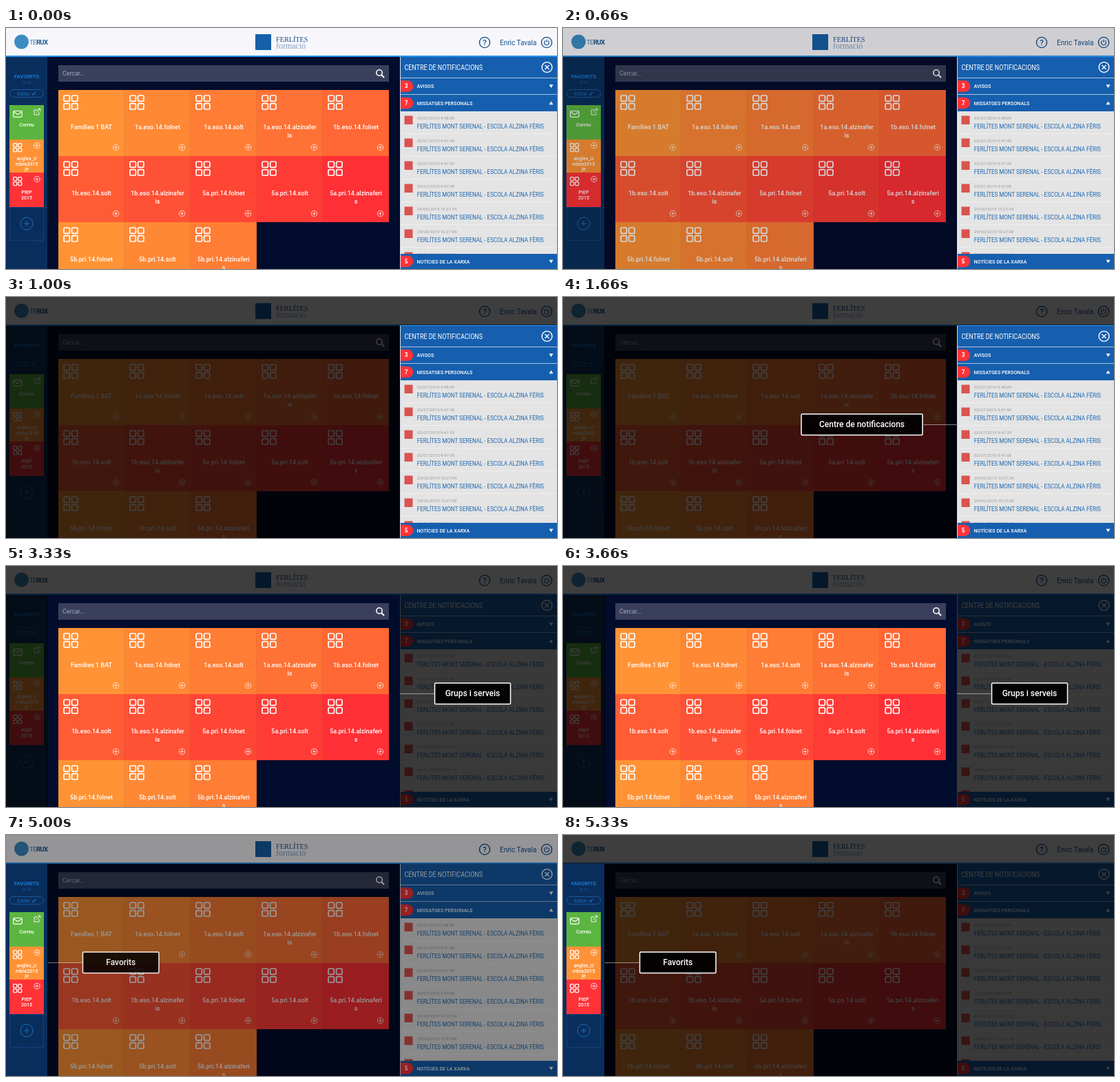
These frames come from a looping animation (800 px wide and 350 px high, 6660 ms). An HTML page:

```html
<!DOCTYPE html>
<html lang="ca">
<head>
<meta charset="utf-8">
<title>Tour</title>
<style>
  html, body { margin: 0; width: 100%; height: 100%; overflow: hidden; background: #020c2d; }
  svg { display: block; }
  text { font-family: Roboto, sans-serif; }
  .serif { font-family: "Liberation Serif", "Noto Serif", serif; }
</style>
</head>
<body>
<svg id="stage" width="800" height="350" viewBox="0 0 800 350"></svg>
<script>
const NARROW = 0.885; // condensed cut of the interface face
const WHITE = '#fff', BLUE = '#165fae', INK = '#17508f', TRIM = '#15599f';

const rect = (x, y, w, h, fill, more = '') =>
  `<rect x="${x}" y="${y}" width="${w}" height="${h}" fill="${fill}" ${more}/>`;
const line = (d, stroke, width = 1, more = '') =>
  `<path d="${d}" fill="none" stroke="${stroke}" stroke-width="${width}" ${more}/>`;
const ring = (x, y, r, stroke, width = 1) =>
  `<circle cx="${x}" cy="${y}" r="${r}" fill="none" stroke="${stroke}" stroke-width="${width}"/>`;
const text = (x, y, size, fill, str, more = '') =>
  `<text x="${x}" y="${y}" font-size="${size}" fill="${fill}" ${more}>${str}</text>`;
const centred = (x, y, size, fill, str, weight = 400) =>
  text(x, y, size, fill, str, `text-anchor="middle" font-weight="${weight}"`);
const narrow = (x, y, size, fill, str, weight = 400) =>
  `<g transform="translate(${x} ${y}) scale(${NARROW} 1)">` +
  text(0, 0, size, fill, str, `font-weight="${weight}"`) + '</g>';
const plus = (x, y, r, arm, stroke, width) =>
  ring(x, y, r, stroke, width) +
  line(`M${x - arm} ${y}h${2 * arm}M${x} ${y - arm}v${2 * arm}`, stroke, width);

// four rounded squares
function groupIcon(x, y, size, step, width) {
  let out = '';
  for (let i = 0; i < 4; i++)
    out += rect(x + (i % 2) * step, y + (i >> 1) * step, size, size, 'none',
      `rx="${size / 4.5}" stroke="#fff" stroke-width="${width}"`);
  return out;
}

function header() {
  return rect(0, 0, 800, 40, '#f7f7fb') + rect(0, 40, 800, 2, '#2a93ee') +
    '<circle cx="22.5" cy="20" r="10.5" fill="#3c8cc4"/>' +
    text(34, 24, 9.5, '#3a78ae', 'TE<tspan font-weight="700" fill="#17568f">RUX</tspan>',
      'letter-spacing="-.6"') +
    rect(362, 9, 23, 23, '#1560a8') +
    text(392, 19.5, 10.2, '#1b4f8b', 'FERLÍTES', 'class="serif"') +
    text(392, 30, 12, '#7f9fc2', 'formació', 'class="serif"') +
    ring(695, 21, 7.6, INK, 1.4) + centred(695, 25.2, 11.5, INK, '?', 500) +
    text(717, 24.6, 10, INK, 'Enric Tavala') +
    ring(785, 21, 7.6, INK, 1.4) +
    line('M783 18.6a3.4 3.4 0 1 0 4 0M785 16.8v4', INK, 1.2);
}

function favourites() {
  const tile = (y, h, fill, lines, base) => rect(5, y, 50, h, fill) +
    lines.map((s, i) => centred(30, base + i * 7.5, 7.1, WHITE, s, 500)).join('');
  return rect(0, 42, 60, 308, '#0a2e5c') +
    centred(30, 72.8, 8.1, '#1b83e2', 'FAVORITS', 500) +
    centred(30, 80.6, 6, TRIM, '3/10') +
    rect(5.5, 89.5, 49, 11, 'none', `rx="5.5" stroke="${TRIM}"`) +
    text(16, 97.8, 7.4, '#1b6fbe', 'Editar') +
    line('M38 95.2l1.8 2 3.4-4.4', '#1b6fbe', 1.3) +
    tile(112, 50, '#5cb540', ['Correu'], 143) +
    rect(10.7, 120.5, 12.4, 8.8, 'none', 'rx="1.5" stroke="#fff" stroke-width="1.2"') +
    line('M11 121.5l6 4.2 6-4.2', WHITE, 1.2) +
    line('M46 119h-5v7h7v-4M44 123l5.5-5.5M46.5 117.3h3.2v3.2', WHITE, .9) +
    tile(162, 48, '#ff9236', ['angles_U', 'mbra2015', 'je'], 192) +
    groupIcon(10.7, 167.7, 5, 7, 1.3) + plus(45, 170.5, 4.2, 2.5, WHITE, .8) +
    tile(210, 50, '#ff3237', ['PIEP', '2015'], 241) +
    groupIcon(10.7, 216.7, 5, 7, 1.3) + plus(45, 219.5, 4.2, 2.5, WHITE, .8) +
    rect(5.5, 260.5, 49, 48, 'none', `stroke="${TRIM}" stroke-dasharray="2 1.5" stroke-width=".8"`) +
    plus(30, 284, 9, 4, '#1b6fbe', 1);
}

const groups = [
  'Famílies 1 BAT', '1a.eso.14.folnet', '1a.eso.14.solt', '1a.eso.14.alzinafer|is', '1b.eso.14.folnet',
  '1b.eso.14.solt', '1b.eso.14.alzinafer|is', '5a.pri.14.folnet', '5a.pri.14.solt', '5a.pri.14.alzinaferi|s',
  '5b.pri.14.folnet', '5b.pri.14.solt', '5b.pri.14.alzinaferi|s'
];

function board() {
  const tiles = groups.map((name, i) => {
    const x = 76 + (i % 5) * 96, y = 90 + Math.floor(i / 5) * 96;
    return rect(x, y, 96, 96, `rgb(255,${147 - 11 * (i % 10)},53)`) +
      rect(x + 95, y, 1, 96, '#000', 'opacity=".07"') +
      groupIcon(x + 8, y + 8, 8.4, 11.6, 1.7) +
      name.split('|').map((s, k) => centred(x + 48, y + 57 + k * 12, 9, WHITE, s, 500)).join('') +
      plus(x + 83.5, y + 83.5, 4.2, 2.5, '#ffe6d8', .9);
  });
  return rect(76, 54, 480, 24, '#3a405b') +
    text(82, 69, 8.8, '#a3abc0', 'Cercar...') +
    ring(542, 65, 4.2, WHITE, 1.6) + line('M545 68l4 4', WHITE, 2) + tiles.join('');
}

function notices() {
  const dates = ['02/07/2015 9:48:09', '02/07/2015 9:47:48', '02/07/2015 9:47:29', '02/07/2015 9:47:08',
    '29/06/2015 10:27:34', '29/06/2015 10:27:08', '29/06/2015 10:26:46'];
  const rows = dates.map((date, i) => {
    const y = 121 + i * 33;
    return rect(578.5, y + 6.5, 12, 12.5, '#d9534f') +
      text(597, y + 11.7, 6.1, '#999', date) +
      narrow(596.8, y + 24.6, 9.1, '#1c68b3', 'FERLÍTES MONT SERENAL - ESCOLA ALZINA FÈRIS') +
      rect(573, y + 32, 227, 1, '#eee');
  });
  const bar = (y, h, count, name, up) => {
    const m = y + h / 2;
    return rect(573, y, 227, h, BLUE) +
      `<path d="M573 ${m - 8.3}h10a8.3 8.3 0 0 1 0 16.6h-10z" fill="#ff3338"/>` +
      centred(581, m + 2.9, 8.2, WHITE, count, 700) +
      narrow(596.5, m + 2.9, 8.1, WHITE, name, 500) +
      `<path d="M788.5 ${m + (up ? 2.2 : -2.2)}h6l-3 ${up ? -4.6 : 4.6}z" fill="#fff"/>`;
  };
  return rect(572, 42, 228, 308, '#e4e4e4') + rows.join('') +
    rect(573, 42, 227, 30, BLUE) +
    narrow(578.5, 60.8, 10.1, WHITE, 'CENTRE DE NOTIFICACIONS') +
    ring(785.5, 57, 7.4, WHITE, 1.4) + line('M782.5 54l6 6m0-6l-6 6', WHITE, 1.4) +
    rect(573, 72, 227, 1, '#a9c4e0') + bar(73, 23, 3, 'AVISOS') +
    rect(573, 96, 227, 1, '#a9c4e0') + bar(97, 24, 7, 'MISSATGES PERSONALS', true) +
    bar(328, 22, 5, 'NOTÍCIES DE LA XARXA') + rect(572, 42, 1, 308, '#d6dfea');
}

// spotlight [x, y, w, h], label box [x, w], leader [from, to]
const stops = {
  news:   { hole: [572, 41, 228, 309], box: [346, 176], lead: [524, 572], name: 'Centre de notificacions' },
  groups: { hole: [61, 42, 511, 308], box: [622.5, 110], lead: [572, 622], name: 'Grups i serveis' },
  favs:   { hole: [0, 42, 60, 308], box: [111.5, 110.5], lead: [61, 111], name: 'Favorits' }
};
const label = ({ box: [x, w], lead: [a, b], name }) =>
  line(`M${a} 185.5H${b}`, WHITE, 1, 'stroke-dasharray="1 1"') +
  rect(x, 170, w, 30.5, '#000', 'fill-opacity=".93" rx="1.5" stroke="#fff" stroke-width="1.5"') +
  centred(x + w / 2, 189.3, 12, WHITE, name, 500);

const stage = document.getElementById('stage');
stage.innerHTML = rect(0, 0, 800, 350, '#020c2d') +
  header() + favourites() + board() + notices() +
  '<path id="shade" fill-rule="evenodd"/>' +
  Object.entries(stops).map(([id, s]) => `<g id="${id}" opacity="0">${label(s)}</g>`).join('');

// start ms, stop, shade, label opacity
const LOOP = 6660;
const steps = [
  [0, 'news', 0, 0], [660, 'news', .16, 0], [1000, 'news', .75, 0], [1330, 'news', .75, 1],
  [3000, 'groups', .16, .9], [3330, 'groups', .75, 1],
  [5000, 'favs', .4, .9], [5330, 'favs', .75, 1]
];
const shade = document.getElementById('shade');
const start = performance.now();
let shown;

function draw() {
  const t = Math.max(0, performance.now() - start) % LOOP;
  const step = steps.filter(s => s[0] <= t).pop();
  if (step !== shown) {
    shown = step;
    const [, stop, dim, alpha] = step;
    const [x, y, w, h] = stops[stop].hole;
    shade.setAttribute('d', `M0 0h800v350h-800zM${x} ${y}h${w}v${h}h${-w}z`);
    shade.setAttribute('opacity', dim);
    for (const id in stops)
      document.getElementById(id).setAttribute('opacity', id === stop ? alpha : 0);
  }
  requestAnimationFrame(draw);
}
draw();
</script>
</body>
</html>
```
